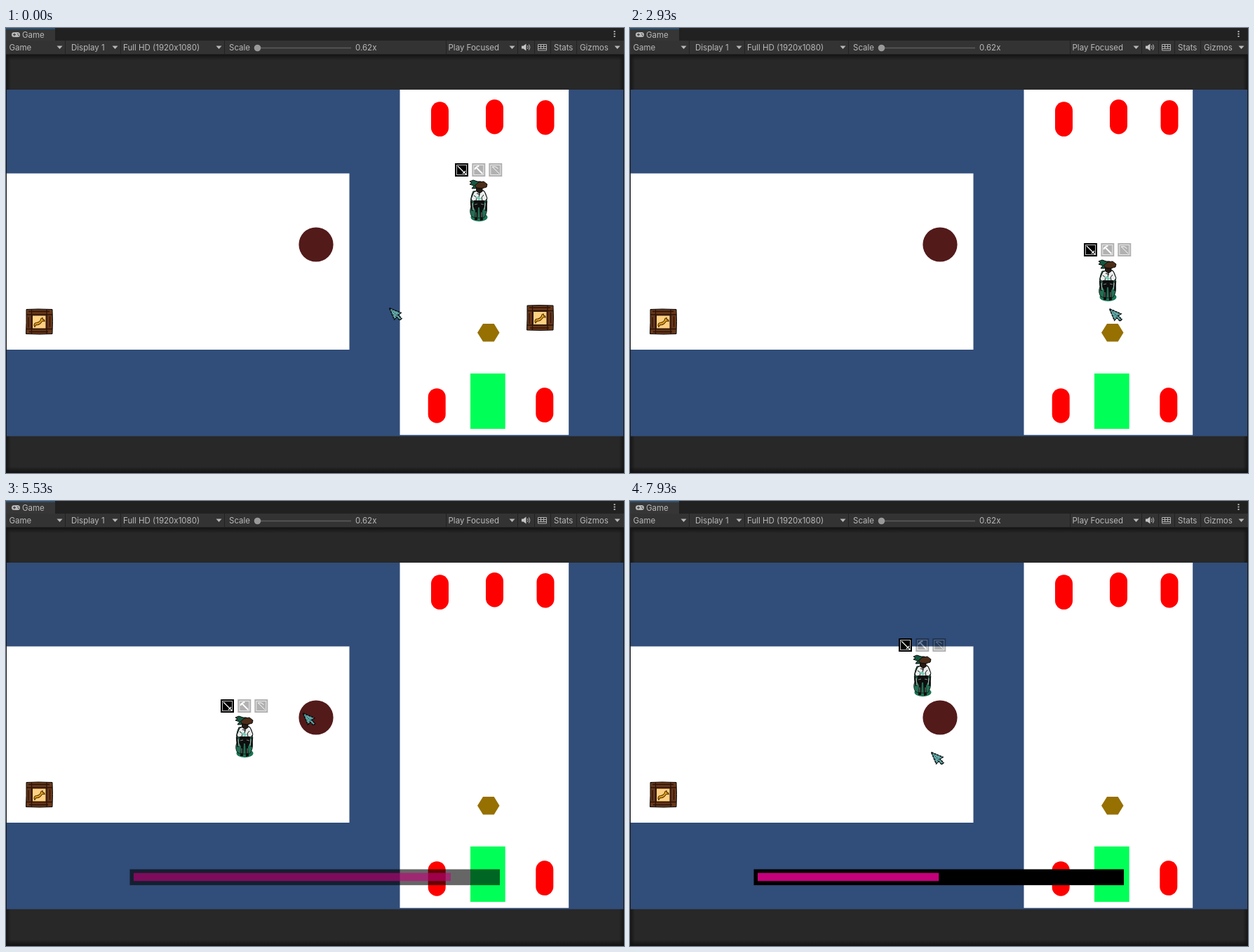
An HTML page that plays this animation: 881 by 635 pixels, repeating every 8000 ms.

```html
<!DOCTYPE html>
<html lang="en">
<head>
<meta charset="utf-8">
<title>Game view</title>
<style>
html, body { margin: 0; width: 100%; height: 100%; overflow: hidden; background: #282828; }
svg { display: block; width: 881px; height: 635px; }
text { font: 11.5px Inter, Roboto, sans-serif; fill: #b9b9b9; }
.ink { stroke: #0b0b0b; stroke-width: 1; stroke-linejoin: round; }
.dim { opacity: .3; }
</style>
</head>
<body>
<svg viewBox="0 0 881 635">
  <defs>
    <linearGradient id="shade" x2="0" y2="1">
      <stop stop-color="#111"/><stop offset="1" stop-color="#111" stop-opacity="0"/>
    </linearGradient>
    <linearGradient id="side">
      <stop stop-color="#151515"/><stop offset="1" stop-color="#151515" stop-opacity="0"/>
    </linearGradient>
    <path id="arrow" d="M0 0h8l-4 4.5z" fill="#b9b9b9"/>
    <rect id="pill" width="25" height="49.5" rx="12.5" fill="#f00"/>
    <g id="crate">
      <path d="M1 1L18 .5 38 1 38.5 18 38 36 20 36.5 .5 36 1 20z" fill="#673719" class="ink"/>
      <path d="M1 8.5H38M1 29H38M8.5 1V36M30 1V36M4 4H34M5 33H32M4 12V27M34.5 11V26" fill="none" stroke="#2b1209" stroke-width="1.3"/>
      <path d="M9.5 9.5H29V28.500H9.500z" fill="#ffd083" stroke="#351709"/>
      <path d="M12 24Q12 20 16 20Q21 19 22 14L24 13 25 16Q27 15 27 18Q23 17 22 20Q19 24 15 23L13 26z" fill="#e6a519" stroke="#4b2905" stroke-width="1.1"/>
    </g>
    <g id="slot">
      <rect width="19" height="19"/>
      <rect x="2.500" y="2.500" width="14" height="14" fill="none" stroke="#fff" stroke-opacity=".75"/>
    </g>
  </defs>

  <rect width="881" height="635" fill="#282828"/>
  <rect y="37" width="881" height="9" fill="url(#shade)"/>
  <rect y="37" width="7" height="598" fill="url(#side)"/>
  <rect y="37" width="7" height="598" fill="url(#side)" transform="matrix(-1 0 0 1 881 0)"/>
  <rect width="881" height="9" fill="url(#shade)" transform="matrix(1 0 0 -1 0 635)"/>

  <rect width="881" height="18" fill="#212121"/>
  <rect width="70" height="18" fill="#363636"/>
  <rect width="70" height="2" fill="#28506f"/>
  <rect y="18" width="881" height="19" fill="#333"/>
  <path d="M0 37.500H881M84.500 18V37M163.500 18V37M311.500 18V37M627.500 18V37M729.500 18V37M753.500 18V37M776.500 18V37M813.500 18V37" stroke="#222"/>
  <rect x="8" y="6" width="12" height="7" rx="3.500" fill="#b9b9b9"/>
  <path d="M10 9.500h4M12 7.500v4M16 8.500h1.500M17 10.500h1.500" stroke="#333"/>
  <path d="M867.500 4v2M867.500 7.500v2M867.500 11v2" stroke="#b9b9b9" stroke-width="2"/>
  <text x="23" y="13.500">Game</text>
  <text x="4.500" y="32">Game</text>
  <text x="93" y="32">Display 1</text>
  <text x="167" y="32">Full HD (1920x1080)</text>
  <text x="318" y="32">Scale</text>
  <text x="498" y="32">0.62x</text>
  <text x="630.500" y="32">Play Focused</text>
  <text x="781" y="32">Stats</text>
  <text x="818" y="32">Gizmos</text>
  <use href="#arrow" x="72.500" y="25.500"/><use href="#arrow" x="151.500" y="25.500"/>
  <use href="#arrow" x="299.500" y="25.500"/><use href="#arrow" x="717.500" y="25.500"/>
  <use href="#arrow" x="867.500" y="25.500"/>
  <path d="M354 28.500H492" stroke="#5c5c5c" stroke-width="1.500"/>
  <circle cx="358.500" cy="28.500" r="4.800" fill="#999"/>
  <path d="M735 25.500h2.500l4-3v10l-4-3H735z" fill="#c4c4c4"/>
  <path d="M743.500 25q1.500 2.500 0 5M745.500 23.500q2.500 4 0 8" fill="none" stroke="#c4c4c4"/>
  <path d="M758.500 23.500h12v8.500h-12zM758.500 26.500h12M758.500 29.500h12M762.500 23.500v6M766.500 23.500v6" fill="none" stroke="#b0b0b0"/>

  <rect x="1" y="88" width="879" height="494.500" fill="#314d79"/>
  <rect x="1" y="207.500" width="488.500" height="251.500" fill="#fff"/>
  <rect x="561.500" y="88" width="240.700" height="492.700" fill="#fff"/>
  <use href="#pill" x="606" y="105.300"/><use href="#pill" x="684" y="102"/>
  <use href="#pill" x="756.500" y="103"/><use href="#pill" x="601.700" y="514.200"/>
  <use href="#pill" x="755.300" y="513.300"/>
  <rect x="662" y="493" width="49.700" height="79" fill="#00ff57"/>
  <path d="M672 434.700L680 422H695.700L703.500 434.700 695.700 447.500H680z" fill="#967000"/>
  <circle cx="442" cy="309" r="24.600" fill="#531a1a"/>
  <use href="#crate" x="28" y="400.500"/>
  <use href="#crate" id="loot" x="742" y="395"/>

  <g id="player">
    <ellipse cx=".5" cy="23" rx="12" ry="6" fill="#1b7453"/>
    <path d="M-8-14Q-13-4-11 8-14 16-10 22L-5 24 7 24Q13 17 11 6 13-8 7-15z" fill="#236f54" stroke="#10251d"/>
    <path d="M-7-13L-11-3-9 0 9 0 12-4 8-14 1-16z" fill="#e9eceb" class="ink"/>
    <path d="M-7-8L-3-5-4-1M1-13L0-4M7-9L4-5 5-1M-3-11L2-9" fill="none" stroke="#151515"/>
    <path d="M-5-5L-1-7 4-3 0-1z" fill="#7fcdb9"/>
    <path d="M-11 0L-9 14M11 0L10 14" stroke="#151515" stroke-width="2.500"/>
    <path d="M-9 3L-8 13M9 3L8 12" stroke="#a9bdb6" stroke-width="1.200"/>
    <path d="M-7-1H8L8 8 5 14 6 27 2 28 1 9-1 9-2 27-6 27-5 13-8 8z" fill="#0d0e0d"/>
    <path d="M-6 5L-2 4M3 4L7 5M-4 16v7M4 16v7" stroke="#8a9692" stroke-width=".9"/>
    <path d="M-4-19H5L5-14 1-11-3-14z" fill="#241a14" class="ink"/>
    <path d="M-13-28L-8-30-2-28 3-28 2-23-5-18-10-18-7-22-13-24-10-26z" fill="#145840" class="ink"/>
    <path d="M-6-22L0-27 7-28 12-24 11-20 4-18-3-19z" fill="#4c2d19" class="ink"/>
  </g>

  <g id="hud">
    <g><use href="#slot"/><path d="M4 4L13 13M11 15L15 11M13 13L16 16" stroke="#fff" stroke-width="1.200"/></g>
    <g class="dim" transform="translate(24.300)"><use href="#slot"/><path d="M6 6L15 15M4 9Q5 5 10 4" fill="none" stroke="#fff" stroke-width="1.800"/></g>
    <g class="dim" transform="translate(48.300)"><use href="#slot"/><path d="M5 5L15 15M5 5Q11 4 13 8" fill="none" stroke="#fff"/></g>
  </g>

  <g id="bar">
    <rect x="176.500" y="525.500" width="527.500" height="22.700"/>
    <rect id="health" x="182" y="530.700" height="11.600" fill="#c4007a"/>
  </g>

  <g id="cursor">
    <path d="M.5.500L17 7.500 13 10.500 18 15.500 15.500 18 11 13.500 7.500 17z" fill="#64a9a9" stroke="#080d0d" stroke-width="1.500" stroke-dasharray="3.500 .7"/>
    <path d="M4 4L12 12M6 11L10 7M9 13L13 8" stroke="#183c40" stroke-dasharray="1.500 1.500"/>
  </g>
</svg>
<script>
const LOOP = 8000, TICK = 1000 / 15;
const el = id => document.getElementById(id);

// Each stop is: tick, x, y
const parse = s => s.split(',').map(p => p.trim().split(' ').map(Number));
const playerPath = parse(`0 674 247, 8 674 247, 13 674 287, 16 650 306, 19.5 629 332,
  26 674 363, 33 734 386, 36 751 378, 39 726 361, 52 609 361, 54 500 361, 56 482 361,
  72 338 358, 78 300 327, 79 300 327, 91 420 357, 96 440 373, 102 485 373, 104 484 372,
  114 381 286, 117 403 261, 119 417 250`);
const cursorPath = parse(`0 546 399, 5 560 397, 13 622 370, 16 642 352, 26 690 378,
  33 738 400, 39 735 403, 52 600 396, 56 593 391, 66 480 335, 72 453 325, 84 420 300,
  96 416 309, 106 445 330, 117 440 357, 119 429 358`);
const hits = [77, 88, 101, 111];

function along(path, tick) {
  const i = path.findIndex(p => p[0] > tick);
  if (i < 0) return path[path.length - 1].slice(1);
  const [t0, x0, y0] = path[i - 1], [t1, x1, y1] = path[i];
  const k = (tick - t0) / (t1 - t0);
  return [x0 + (x1 - x0) * k, y0 + (y1 - y0) * k];
}

const place = (id, x, y) => el(id).setAttribute('transform', `translate(${x} ${y})`);

function draw(ms) {
  const tick = Math.floor((ms % LOOP + 3.4) / TICK) % 120;
  const [x, y] = along(playerPath, tick);
  place('player', x, y);
  place('hud', x - 34, y - 54);
  place('cursor', ...along(cursorPath, tick));
  el('loot').style.display = tick < 36 ? '' : 'none';

  const alpha = Math.max(0, Math.min(1, (tick - 56) / 45));
  for (const part of el('bar').children) part.setAttribute('opacity', alpha);
  const taken = hits.filter(h => tick >= h).length;
  el('health').setAttribute('width', 516.5 * (1 - taken / 8));
}

let start;
function frame(now) {
  start ??= now;
  draw(now - start);
  requestAnimationFrame(frame);
}
draw(0);
requestAnimationFrame(frame);
</script>
</body>
</html>
```
